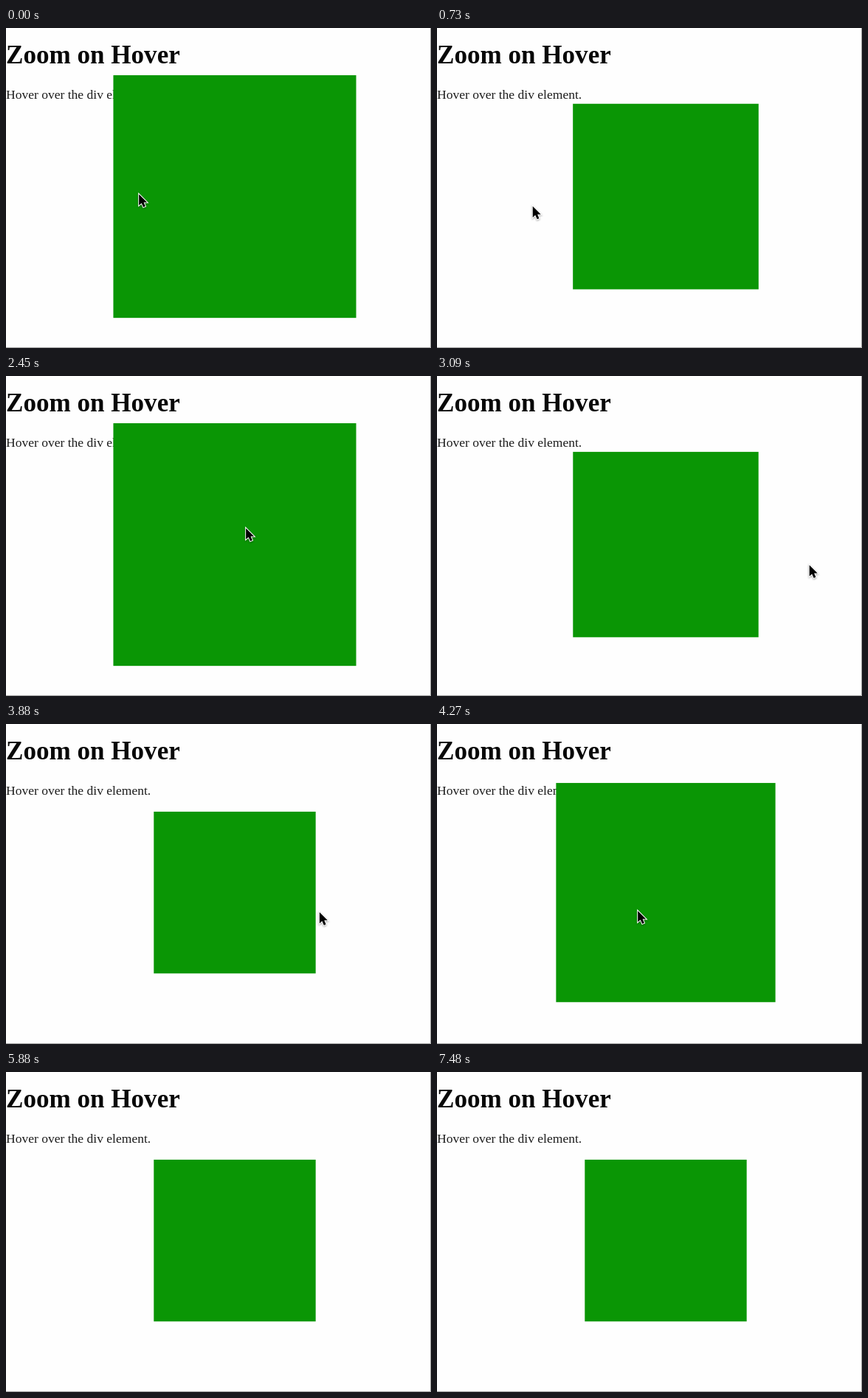
Animation of 576x434 px, one loop 8.21 s. Source, as an HTML page:

```html
<!DOCTYPE html>
<html lang="en">
<head>
<meta charset="utf-8">
<title>Zoom on Hover</title>
<style>
  html, body { margin: 0; width: 100%; height: 100%; overflow: hidden; background: #fefefe; }
  svg { display: block; width: 100%; height: 100%; }
  text { font-family: "Liberation Serif", "Times New Roman", serif; fill: #080808; }
  #cursor { filter: drop-shadow(0 1px 1px rgba(0, 0, 0, .35)); }
</style>
</head>
<body>
<svg viewBox="0 0 576 434">
  <rect width="576" height="434" fill="#fefefe"/>
  <text x="0" y="47.7" font-size="35.1" font-weight="bold">Zoom on Hover</text>
  <text x="0" y="95.7" font-size="17.55" style="fill: #1c1c1c">Hover over the div element.</text>
  <rect id="box" fill="#0a9605"/>
  <path d="M575.5 0V433.5H0" fill="none" stroke="#a2a2a2"/>
  <path id="cursor" d="M1.2 2.4V17.6L4.7 14.4L7.2 20L9.9 18.8L7.6 13.4H12.2Z"
        fill="#000" stroke="#fff" stroke-width="2" paint-order="stroke"/>
</svg>
<script>
const LOOP = 8210, ZOOM_TIME = 500, GROWTH = 0.5;
const CX = 310, CY = 228.6, SIDE = 219.4, CURSOR_END = 5880;
const box = document.getElementById('box');
const cursor = document.getElementById('cursor');

// The pointer leaves and enters the box in turn.
const hovers = [378, 1676, 2737, 3916, 4770];
const stalls = [[378, 420], [2640, 2910], [4420, 4820]];
// Pointer moves: start, end, x, y
const home = [179, 223];
const moves = [
  [260, 270, 163, 229], [378, 940, 123, 241], [1090, 1180, 115, 243],
  [1580, 1880, 225, 195], [1880, 2180, 237, 192],
  [2390, 2640, 440, 220], [2640, 3000, 503.5, 254],
  [3790, 4270, 271, 251], [4500, 4900, 492, 254],
  [5470, 5480, 506, 256], [5690, 5700, 512, 258]
];

const clamp = v => Math.min(1, Math.max(0, v));
const easeOut = p => 1 - (1 - p) ** 2;

function zoomAt(t) {
  return hovers.reduce((level, at, i) =>
    level + (i % 2 ? 1 : -1) * clamp((t - at) / ZOOM_TIME), 1);
}

function pointerAt(t) {
  return moves.reduce(([x, y], [from, to, nx, ny]) => {
    const p = easeOut(clamp((t - from) / (to - from)));
    return [x + (nx - x) * p, y + (ny - y) * p];
  }, home);
}

function draw(now) {
  const stall = stalls.find(([a, b]) => now >= a && now < b);
  const t = stall ? stall[0] : now;
  const side = SIDE * (1 + GROWTH * zoomAt(t));
  box.setAttribute('x', CX - side / 2);
  box.setAttribute('y', CY - side / 2);
  box.setAttribute('width', side);
  box.setAttribute('height', side);
  cursor.setAttribute('transform', `translate(${pointerAt(t)})`);
  cursor.setAttribute('visibility', t < CURSOR_END ? 'visible' : 'hidden');
}

const start = performance.now();
function tick() {
  draw((performance.now() - start) % LOOP);
  requestAnimationFrame(tick);
}
tick();
</script>
</body>
</html>
```
